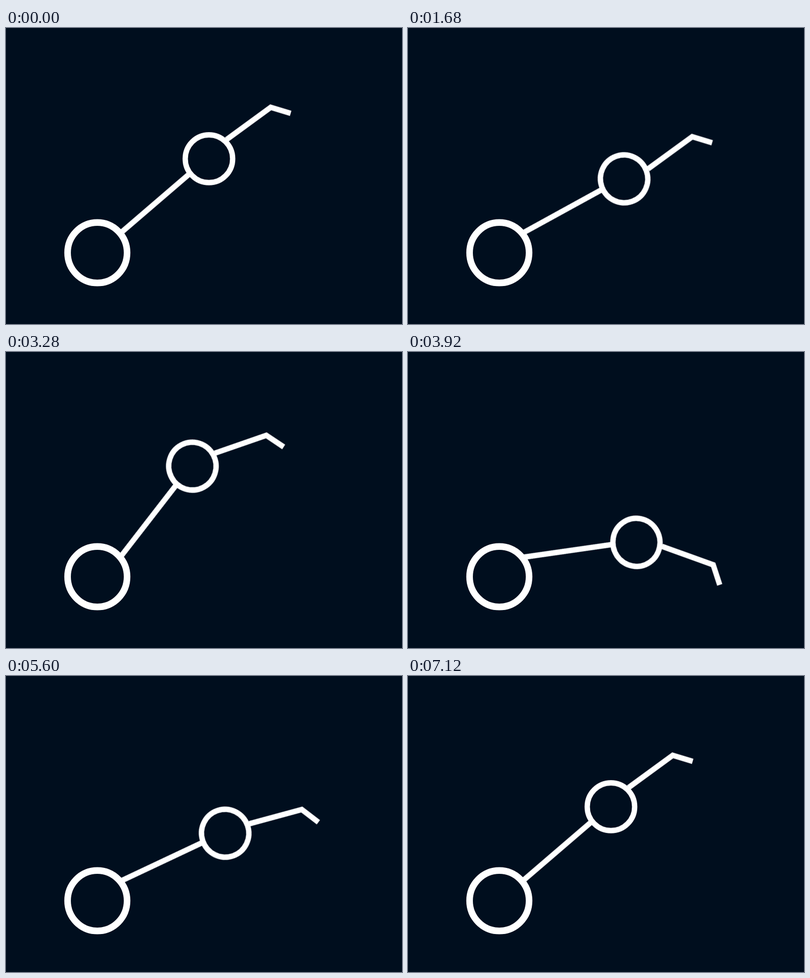
These frames come from a looping animation (800x600 px, 8.04 s). An HTML page:

```html
<!DOCTYPE html>
<html lang="en">
<head>
<meta charset="utf-8">
<title>Robot arm</title>
<style>
  html, body { margin: 0; width: 100%; height: 100%; overflow: hidden; background: #000e1e; }
  svg { display: block; width: 800px; height: 600px; }
  .stage { fill: none; stroke: #fff; stroke-width: 10.8; }
  .base { stroke-width: 13.3; }

  .arm, .elbow, .hand { animation: 8040ms linear infinite; }
  .arm   { transform-origin: 230.5px 408.2px; animation-name: arm; }
  .elbow { transform-origin: 410px 259.8px;   animation-name: elbow; }
  .hand  { transform-origin: 445.5px 221.8px; animation-name: hand; }

  /* each step lasts 40 ms */
  @keyframes arm {
    0%     { transform: rotate(0deg);     animation-timing-function: steps(31); }
    15.42% { transform: rotate(24.7deg);  animation-timing-function: steps(45); }
    37.81% { transform: rotate(-28deg);   animation-timing-function: steps(22); }
    48.75% { transform: rotate(32.2deg);  animation-timing-function: steps(80); }
    88.55%, 100% { transform: rotate(0deg); }
  }
  @keyframes elbow {
    0%     { transform: rotate(0deg);     animation-timing-function: steps(31); }
    15.42% { transform: rotate(7.2deg);   animation-timing-function: steps(45); }
    37.81% { transform: rotate(31deg);    animation-timing-function: steps(22); }
    48.75% { transform: rotate(23.5deg);  animation-timing-function: steps(27); }
    62.18% { transform: rotate(14.8deg);  animation-timing-function: steps(53); }
    88.55%, 100% { transform: rotate(0deg); }
  }
  @keyframes hand {
    0%     { transform: rotate(0deg);     animation-timing-function: steps(31); }
    15.42% { transform: rotate(-32.6deg); animation-timing-function: steps(45); }
    37.81%, 48.75% { transform: rotate(-0.5deg); animation-timing-function: steps(27); }
    62.18% { transform: rotate(47deg);    animation-timing-function: steps(23); }
    73.63% { transform: rotate(-33deg);   animation-timing-function: steps(30); }
    88.55%, 100% { transform: rotate(0deg); }
  }
</style>
</head>
<body>
<svg viewBox="0 0 800 600">
  <g class="stage" transform="scale(1 1.02)">
    <circle class="base" cx="184.5" cy="446.6" r="60.1"/>
    <g class="arm">
      <path d="M230.5 408.2L372.6 288.1"/>
      <g class="elbow">
        <ellipse cx="410" cy="259.8" rx="47.9" ry="47.5"/>
        <path class="hand" d="M445.5 221.8L534.8 157.6L575.1 169.5"/>
      </g>
    </g>
  </g>
</svg>
</body>
</html>
```
